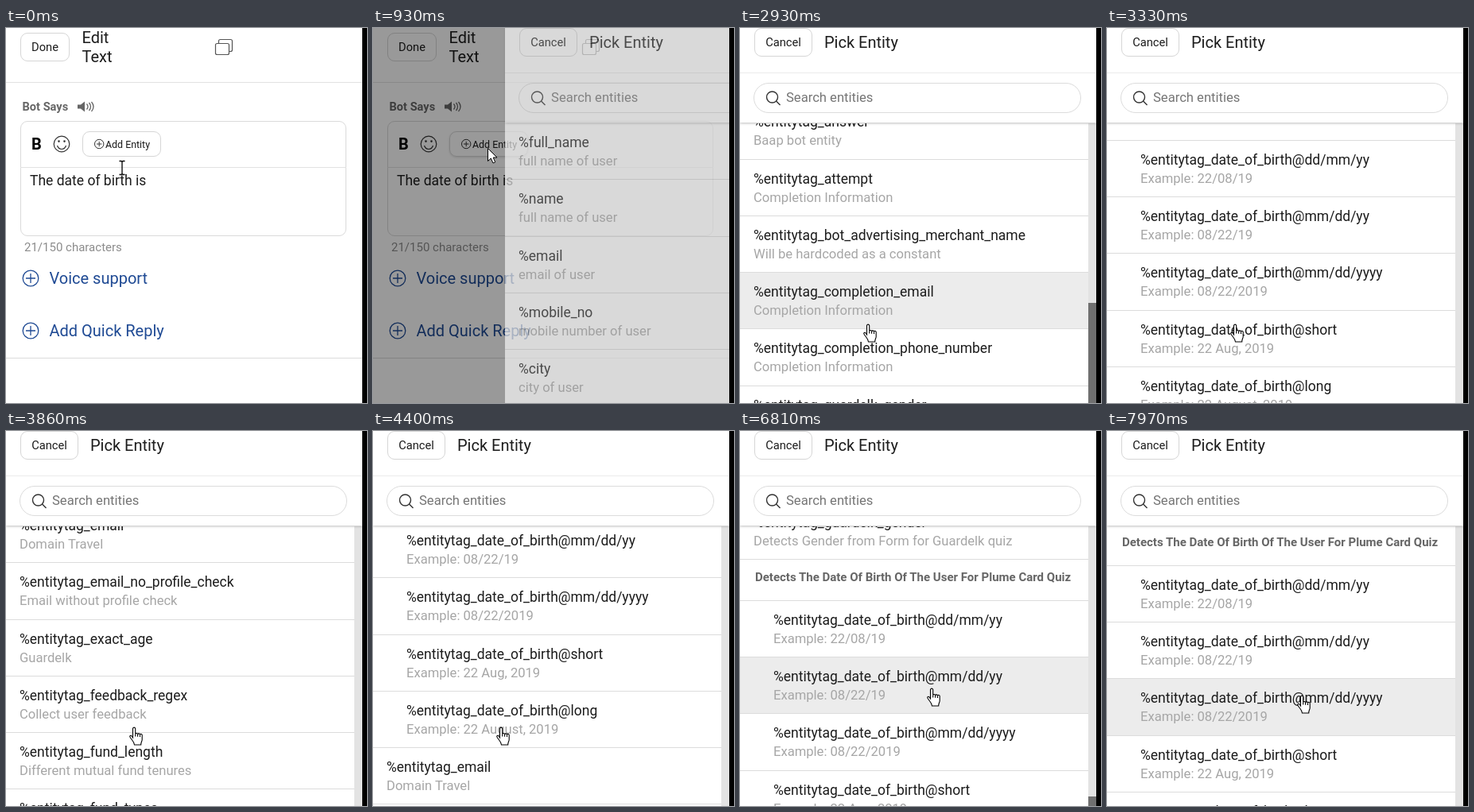
An HTML page for the animation above (8 s loop, 454x472 px).

```html
<!DOCTYPE html>
<html lang="en">
<head>
<meta charset="utf-8">
<title>Pick Entity</title>
<style>
html, body { margin: 0; width: 100%; height: 100%; overflow: hidden; background: #fff; }
#stage { position: relative; width: 454px; height: 472px; overflow: hidden; font: 17.5px/24px Roboto, sans-serif; color: #1c1c1c; }
#stage div, #stage svg { position: absolute; box-sizing: border-box; white-space: nowrap; }
.fill { left: 0; top: 0; width: 448px; height: 472px; background: #fff; }
.btn { border: 1px solid #d6d6d6; border-radius: 9px; font-size: 14.7px; line-height: 34px; text-align: center; }
.line { left: 0; width: 448px; height: 1px; background: #e2e2e2; }
.big { font-size: 20px; }
.link { left: 54.5px; font-size: 20px; color: #1f4a94; }
#shade { background: #000; }
#bar { left: 448px; top: 0; width: 6px; height: 472px; background: #000; }
#head { left: 0; top: 0; width: 448px; height: 119px; background: #fff; box-shadow: 0 1px 3px #0004; }
#search { left: 17px; top: 69px; width: 412px; height: 38px; border: 1px solid #dcdcdc; border-radius: 19px; }
#list { left: 0; top: 120px; width: 448px; height: 352px; overflow: hidden; }
#rows { left: 0; top: 0; width: 438px; }
#track { left: 438px; top: 0; width: 10px; height: 352px; background: #e3e3e3; }
#thumb { left: 0; top: 0; width: 10px; height: 150px; background: #707070; }
.row { left: 0; width: 438px; border-bottom: 1px solid #dcdcdc; padding: 12px 0 0 17px; }
.row.sub { padding-left: 42px; }
.row.group { padding: 10px 0 0 19px; font-size: 15px; font-weight: 700; color: #666; }
.row.hover { background: #ececec; }
.row small { display: block; font-size: 16.6px; color: #a6a6a6; }
#cursor { left: 0; top: 0; overflow: visible; }
</style>
</head>
<body>
<div id="stage">
  <div class="fill">
    <div class="btn" style="left:18px;top:6px;width:62px;height:36px">Done</div>
    <div class="big" style="left:95.5px;top:0">Edit<br>Text</div>
    <div class="line" style="top:68px"></div>
    <div style="left:20.5px;top:87px;font-size:14.6px;font-weight:700;color:#666">Bot Says</div>
    <div style="left:18px;top:117px;width:410px;height:145px;border:1px solid #dadada;border-radius:9px"></div>
    <div class="line" style="left:18px;top:175px;width:410px"></div>
    <div style="left:32px;top:134px;font-size:20px;font-weight:700;color:#000">B</div>
    <div id="add" class="btn" style="left:96px;top:130px;width:99px;height:32px;font-size:12.4px;line-height:31px;text-align:left;padding-left:28px">Add Entity</div>
    <div style="left:30px;top:180px">The date of birth is</div>
    <div style="left:23px;top:264px;font-size:15px;color:#8c8c8c">21/150 characters</div>
    <div class="link" style="top:303px">Voice support</div>
    <div class="link" style="top:369px">Add Quick Reply</div>
    <div class="line" style="top:415px;background:#dcdcdc"></div>
    <svg width="448" height="472" fill="none" stroke="#333" stroke-width="1.2">
      <path d="M267.5 19V16.500q0-2 2-2H282.500q2 0 2 2V27.500q0 2-2 2H281" stroke="#555"/>
      <rect x="263.500" y="19.500" width="17" height="14" rx="2" stroke="#555"/>
      <path d="M90 96.500h4l5-4v13l-5-4h-4z" fill="#666" stroke="none"/>
      <path d="M101.500 95.500q3 3.500 0 7M104.500 94q4 5 0 10M107.500 93q5 6 0 12" stroke="#666" stroke-width="1.300"/>
      <circle cx="70" cy="146" r="9.800"/>
      <path d="M64.500 148q1.500 4.500 5.500 4.500t5.500-4.500"/>
      <path d="M66.500 142.500v.1M73.500 142.500v.1" stroke-width="2.600" stroke-linecap="round"/>
      <path d="M111.500 146a5.700 5.700 0 1 0 11.400 0a5.700 5.700 0 1 0-11.400 0M114 146h6.400M117.200 142.800v6.400" stroke-width="1"/>
      <g id="plus" stroke="#1f4a94" stroke-width="1.300"><circle cx="31" cy="315" r="9.800"/><path d="M25 315h12M31 309v12"/></g>
      <use href="#plus" y="66"/>
    </svg>
  </div>
  <div id="shade" class="fill"></div>
  <div id="panel" class="fill">
    <div id="list">
      <div id="rows"></div>
      <div id="track"><div id="thumb"></div></div>
    </div>
    <div id="head">
      <div class="btn" style="left:18px;top:0;width:73px;height:36px">Cancel</div>
      <div class="big" style="left:106px;top:6px">Pick Entity</div>
      <div class="line" style="top:56px;background:#ebebeb"></div>
      <div id="search"></div>
      <svg width="60" height="110" fill="none" stroke="#333" stroke-width="1.400"><circle cx="40.500" cy="87" r="7"/><path d="M45.500 92l5 5"/></svg>
      <div style="left:58px;top:76px;font-size:16.6px;color:#757575">Search entities</div>
    </div>
  </div>
  <div id="bar"></div>
  <svg id="cursor" width="20" height="26" stroke="#000">
    <path id="beam" d="M-3.500-8.500h2.500l1 1l1-1H3.500M0-7.500V7.500M-3.500 8.500h2.500l1-1l1 1H3.500" fill="none" stroke-width="1.300"/>
    <path id="arrow" d="M.5.500V16.500L4.300 13L7 19L9.700 17.800L7.200 12H12z" fill="#fff"/>
    <g id="hand" transform="translate(-5 .5)" fill="#fff" stroke-width="1.100">
      <path d="M4.500 13.500V2.200a1.600 1.600 0 0 1 3.200 0V9a1.500 1.500 0 0 1 2.900.3a1.500 1.500 0 0 1 2.900.6a1.400 1.400 0 0 1 2.700.8V16c0 2-1.500 3-1.500 6.500H6.500C6.500 19 3.500 17 1 12.800c-1-1.800 1-2.800 2.100-1.300z"/>
      <path d="M7.700 9v3M10.600 9.300v3M13.500 10v2.500"/>
    </g>
  </svg>
</div>
<script>
const LOOP = 8000, LIST_TOP = 120, ROW = 71.25, GROUP = 52, THUMB_RATIO = 0.315;
const $ = id => document.getElementById(id);

const tag = (name, note) => ['%entitytag_' + name, note];
const sub = (name, note) => [name, 'Example: ' + note, 'sub'];
const birth = (format, note) => sub('%entitytag_date_of_birth@' + format, note);
const group = title => [title, '', 'group'];
const entities = [
  ['%full_name', 'full name of user'],
  ['%name', 'full name of user'],
  ['%email', 'email of user'],
  ['%mobile_no', 'mobile number of user'],
  ['%city', 'city of user'],
  ['%pincode', 'pincode of user'],
  group('Detects The Date Given By The User'),
  sub('%date@dd/mm/yy', '22/08/19'),
  sub('%date@mm/dd/yy', '08/22/19'),
  tag('age', 'Completion Information'),
  tag('answer', 'Baap bot entity'),
  tag('attempt', 'Completion Information'),
  tag('bot_advertising_merchant_name', 'Will be hardcoded as a constant'),
  tag('completion_email', 'Completion Information'),
  tag('completion_phone_number', 'Completion Information'),
  tag('guardelk_gender', 'Detects Gender from Form for Guardelk quiz'),
  group('Detects The Date Of Birth Of The User For Plume Card Quiz'),
  birth('dd/mm/yy', '22/08/19'),
  birth('mm/dd/yy', '08/22/19'),
  birth('mm/dd/yyyy', '08/22/2019'),
  birth('short', '22 Aug, 2019'),
  birth('long', '22 August, 2019'),
  tag('email', 'Domain Travel'),
  tag('email_no_profile_check', 'Email without profile check'),
  tag('exact_age', 'Guardelk'),
  tag('feedback_regex', 'Collect user feedback'),
  tag('fund_length', 'Different mutual fund tenures'),
  tag('fund_types', 'Different mutual fund types'),
  tag('gender', 'Completion Information'),
];

let bottom = 0;
const rows = entities.map(([title, note, kind = '']) => {
  const el = document.createElement('div');
  const top = bottom, height = kind === 'group' ? GROUP : ROW;
  bottom += height;
  el.className = 'row ' + kind;
  // whole-pixel edges keep the dividers crisp
  el.style.top = Math.round(top) + 'px';
  el.style.height = Math.round(bottom) - Math.round(top) + 'px';
  el.append(title);
  if (note) {
    const small = document.createElement('small');
    small.textContent = note;
    el.append(small);
  }
  $('rows').append(el);
  return { el, top, bottom, kind };
});

const clamp = x => Math.min(1, Math.max(0, x));
const ease = x => (1 - Math.cos(Math.PI * clamp(x))) / 2;

// keys: [time, value, ...] rows, eased from one to the next
function sample(keys, t) {
  const next = keys.findIndex(key => key[0] > t);
  if (next === 0) return keys[0].slice(1);
  if (next < 0) return keys[keys.length - 1].slice(1);
  const [a, b] = [keys[next - 1], keys[next]];
  const p = ease((t - a[0]) / (b[0] - a[0]));
  return a.slice(1).map((v, i) => v + (b[i + 1] - v) * p);
}

const scrollKeys = [
  [1950, 0], [2480, 719], [2930, 719], [3720, 1562], [3790, 1562], [4480, 1240],
  [4620, 1240], [4930, 1088], [5010, 1086], [5390, 1079], [7180, 1079], [7420, 1123],
];
const pointerKeys = [
  [100, 146, 176], [380, 144, 151], [1080, 144, 151], [1470, 160, 372],
  [5470, 160, 372], [5860, 192, 252], [6260, 207, 299], [6340, 207, 299], [6810, 240, 323],
  [7650, 240, 323], [7800, 242, 300], [7970, 244, 332],
];
const scrollAt = t => sample(scrollKeys, t)[0];

function draw(t) {
  const slide = ease((t - 700) / 396);
  $('shade').style.opacity = 0.4 * clamp((t - 700) / 200);
  $('panel').style.opacity = slide;
  $('panel').style.transform = `translateX(${448 * (1 - slide)}px)`;

  const scroll = scrollAt(t);
  $('rows').style.transform = `translateY(${-Math.round(scroll)}px)`;
  $('thumb').style.transform = `translateY(${Math.round(scroll * THUMB_RATIO)}px)`;

  const [x, y] = sample(pointerKeys, t).map(Math.round);
  const onPanel = t > 1050, onButton = y < 162 && !onPanel;
  $('cursor').style.transform = `translate(${x}px, ${y}px)`;
  $('beam').style.display = onButton || onPanel ? 'none' : '';
  $('arrow').style.display = onButton ? '' : 'none';
  $('hand').style.display = onPanel ? '' : 'none';
  $('add').style.boxShadow = onButton ? '0 1px 3px #0002' : 'none';

  const scrolling = Math.abs(scroll - scrollAt(t - 80)) > 5;
  const spot = y - LIST_TOP + scroll;
  for (const row of rows) {
    const hover = onPanel && !scrolling && row.kind !== 'group' && spot >= row.top && spot < row.bottom;
    row.el.classList.toggle('hover', hover);
  }
}

const start = performance.now();
function tick() {
  draw((performance.now() - start) % LOOP);
  requestAnimationFrame(tick);
}
tick();
</script>
</body>
</html>
```
